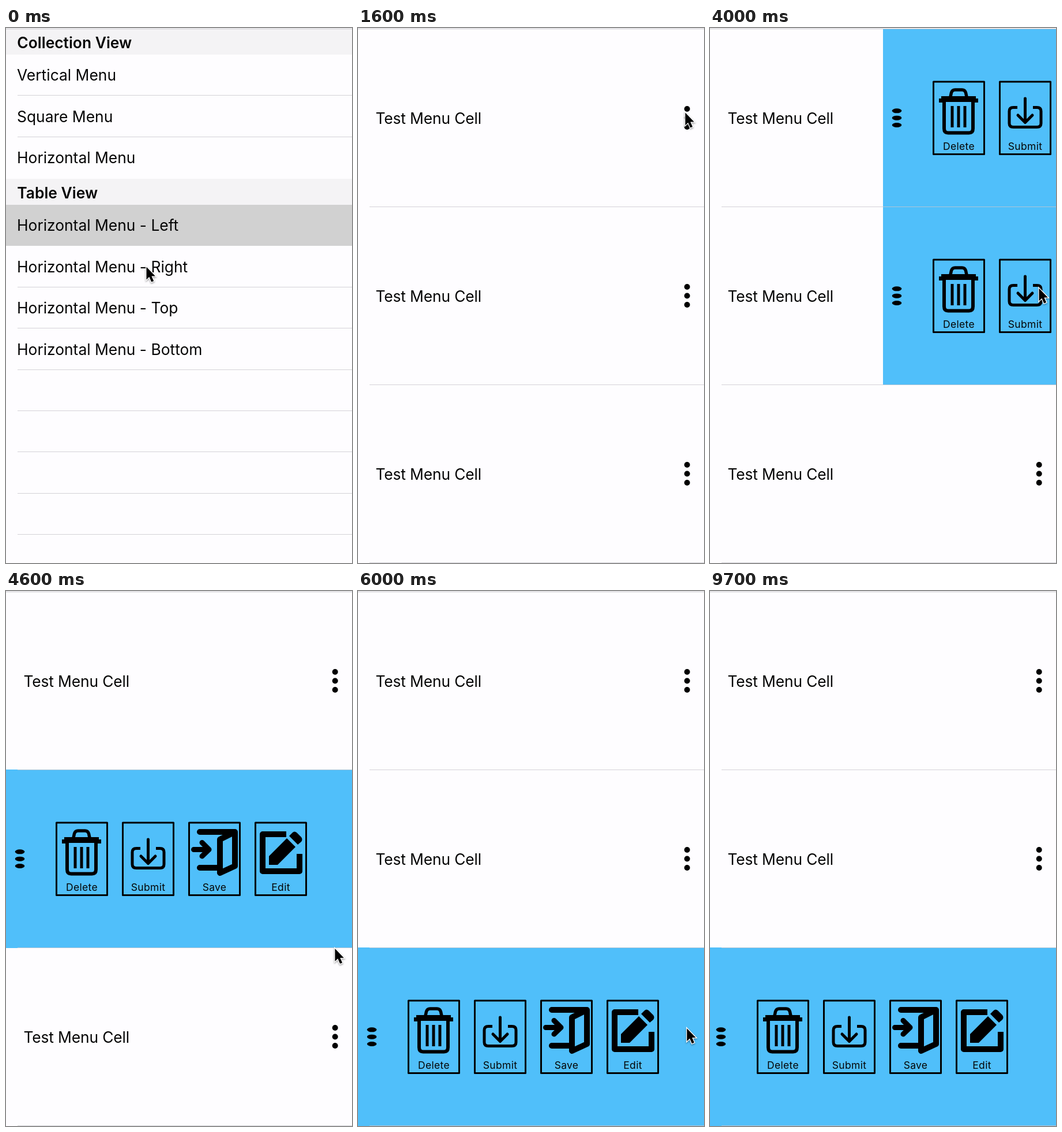
An HTML page with a canvas that plays this animation: 600 by 926 pixels, repeating every 9800 ms.

```html
<!DOCTYPE html>
<html lang="en">
<head>
<meta charset="utf-8">
<title>Cell menu</title>
<style>
  html, body { margin: 0; width: 100%; height: 100%; overflow: hidden; background: #fefdff; }
  canvas { display: block; width: 600px; height: 926px; }
</style>
</head>
<body>
<canvas id="stage" width="600" height="926"></canvas>
<script>
const ctx = document.getElementById('stage').getContext('2d');
const LOOP = 9800, W = 600, H = 926, ROW = 308;
const WHITE = '#fefdff', BLUE = '#50bffa', LINE = 'rgba(200,199,204,.78)', INK = '#050505';
const BODY = '26.4px Inter, sans-serif';
const HEADING = '600 ' + BODY;
const LABEL = '17.5px Inter, sans-serif';

// Cursor stops: time, x, y
const cursorPath = [
  [0, 243, 413], [400, 243, 413], [1100, 434, 190], [1600, 567, 146], [2300, 567, 146],
  [2800, 556, 416], [3300, 570, 450], [4300, 570, 450], [4850, 570, 758],
  [6000, 570, 758], [6600, 500, -45]
];

// When each row's menu opens and closes
const rowTimes = [[2000, 3701], [3701, 5148], [5148, Infinity]];
const SLIDE = 600;

const arrow = new Path2D('M0 0V22L4.900 17.300L8.700 26L12.700 24.400L8.900 15.900H15.400Z');

// Each icon part: path, stroke width (0 fills it)
const icons = [
  { label: 'Delete', parts: [
    ['M117 119L118.500 112Q120 107 125 107H137Q142 107 143.500 112L145 119', 5.5],
    ['M101 118H161V122H165V129H159V128H103V129H97V122H101Z', 0],
    ['M106 127V174Q106 181.500 113 181.500H149Q156 181.500 156 174V127', 6],
    ['M120 135V172M131 135V172M142 135V172', 5]
  ] },
  { label: 'Submit', parts: [
    ['M233 137.500H226Q219 137.500 219 144V165Q219 171.500 226 171.500H267Q274 171.500 274 165V144Q274 137.500 267 137.500H260', 5],
    ['M246.500 122V162M234 151L246.500 163.500L259 151', 5, 'round']
  ] },
  { label: 'Save', parts: [
    ['M336 109H397V168L371 180V122L397 109M336 171H371', 10, 'round'],
    ['M325.500 139.500H350M340 127.500L352 139.500L340 151', 9, 'round']
  ] },
  { label: 'Edit', parts: [
    ['M486 113H445V177H509V147', 10],
    ['M456 166V151L487 120L502 135L471 166Z', 0],
    ['M491 116L497 110Q500 107 504 110L512 118Q515 122 512 126L506 131Z', 0]
  ] }
].map(({ label, parts }) => ({
  label, parts: parts.map(([d, width, cap]) => ({ path: new Path2D(d), width, cap }))
}));

const clamp = v => Math.min(1, Math.max(0, v));
const smooth = v => v * v * (3 - 2 * v);
const ramp = (t, start, length) => smooth(clamp((t - start) / length));

function rect(x, y, w, h, color) {
  ctx.fillStyle = color;
  ctx.fillRect(x, y, w, h);
}

function text(str, x, y, font, align = 'left', spacing = '0px') {
  ctx.font = font;
  ctx.textAlign = align;
  ctx.letterSpacing = spacing;
  ctx.fillStyle = INK;
  ctx.fillText(str, x, y);
}

function dots(x, ys, rx, ry) {
  ctx.fillStyle = '#000';
  for (const y of ys) {
    ctx.beginPath();
    ctx.ellipse(x, y, rx, ry, 0, 0, 7);
    ctx.fill();
  }
}

function drawList() {
  const pitch = 71.4;
  const section = (title, top, items, lines) => {
    for (let i = 1; i <= lines; i++) rect(20, Math.round(top + 45 + i * pitch) - 1, 580, 1, LINE);
    rect(0, top, W, 45, '#f4f3f5');
    text(title, 19.3, top + 33.6, HEADING);
    items.forEach((item, i) => text(item, 19, top + 90.4 + i * pitch, BODY));
  };
  rect(0, 0, W, H, WHITE);
  rect(0, 306, W, 71, '#d1d1d1');
  section('Collection View', 1, ['Vertical Menu', 'Square Menu', 'Horizontal Menu'], 2);
  section('Table View', 261, ['Left', 'Right', 'Top', 'Bottom'].map(s => 'Horizontal Menu - ' + s), 8);
  rect(0, 376, W, 1, '#d1d1d1');
}

function drawMenu(x, scroll) {
  rect(x, 1, W - x, ROW + 1, BLUE);
  ctx.save();
  ctx.beginPath();
  ctx.rect(x, 1, W - x, ROW + 1);
  ctx.clip();
  ctx.translate(x - scroll, 0);
  dots(24, [143.3, 155.7, 168], 8.3, 4);
  ctx.strokeStyle = '#000';
  ctx.lineJoin = 'round';
  icons.forEach(({ label, parts }, i) => {
    const left = 86 + i * 115;
    ctx.lineWidth = 3;
    ctx.lineCap = 'butt';
    ctx.strokeRect(left + 1.5, 93, 88, 125.5);
    ctx.fillStyle = '#000';
    for (const { path, width, cap } of parts) {
      ctx.lineWidth = width || 1;
      ctx.lineCap = cap || 'butt';
      if (width) ctx.stroke(path);
      else ctx.fill(path);
    }
    text(label, left + 45.5, 210.5, LABEL, 'center', '0.3px');
  });
  ctx.restore();
}

function drawCells(t) {
  rect(0, 0, W, H, WHITE);
  rowTimes.forEach(([open, close], i) => {
    const shown = ramp(t, open, SLIDE) - ramp(t, close, SLIDE);
    ctx.save();
    ctx.translate(0, i * ROW);
    text('Test Menu Cell', 30.5, 165.5, BODY, 'left', '-0.15px');
    dots(570.7, [140, 155.5, 171], 5, 5);
    if (shown > 0) drawMenu(Math.round(W * (1 - shown)), i === 2 ? 5 * ramp(t, 6000, 300) : 0);
    ctx.restore();
  });
  for (let i = 1; i <= 3; i++) rect(20, i * ROW + 1, 580, 1, LINE);
}

function drawCursor(t) {
  const next = cursorPath.findIndex(p => p[0] > t);
  if (next < 0) return;
  const [t0, x0, y0] = cursorPath[next - 1], [t1, x1, y1] = cursorPath[next];
  const k = (t - t0) / (t1 - t0);
  ctx.save();
  ctx.translate(x0 + (x1 - x0) * k + 0.5, y0 + (y1 - y0) * k + 0.5);
  ctx.shadowColor = 'rgba(0,0,0,.4)';
  ctx.shadowBlur = 3;
  ctx.shadowOffsetY = 1.5;
  ctx.lineWidth = 2.6;
  ctx.lineJoin = 'miter';
  ctx.strokeStyle = '#fff';
  ctx.stroke(arrow);
  ctx.shadowColor = 'transparent';
  ctx.fillStyle = '#000';
  ctx.fill(arrow);
  ctx.restore();
}

function draw(t) {
  const push = t < 200 ? 0 : 1 - (1 - clamp((t - 150) / 500)) ** 3;
  if (push < 1) {
    ctx.save();
    ctx.translate(-0.3 * W * push, 0);
    drawList();
    ctx.restore();
    rect(0, 0, W, H, `rgba(0,0,0,${0.1 * push})`);
  }
  if (push > 0) {
    ctx.save();
    ctx.translate(W * (1 - push), 0);
    drawCells(t);
    ctx.restore();
  }
  rect(0, 0, W, 1, WHITE);
  rect(0, 1, W, 1, '#c6c5ca');
  drawCursor(t);
}

const start = performance.now();
function tick() {
  draw((performance.now() - start) % LOOP);
  requestAnimationFrame(tick);
}
tick();
</script>
</body>
</html>
```
